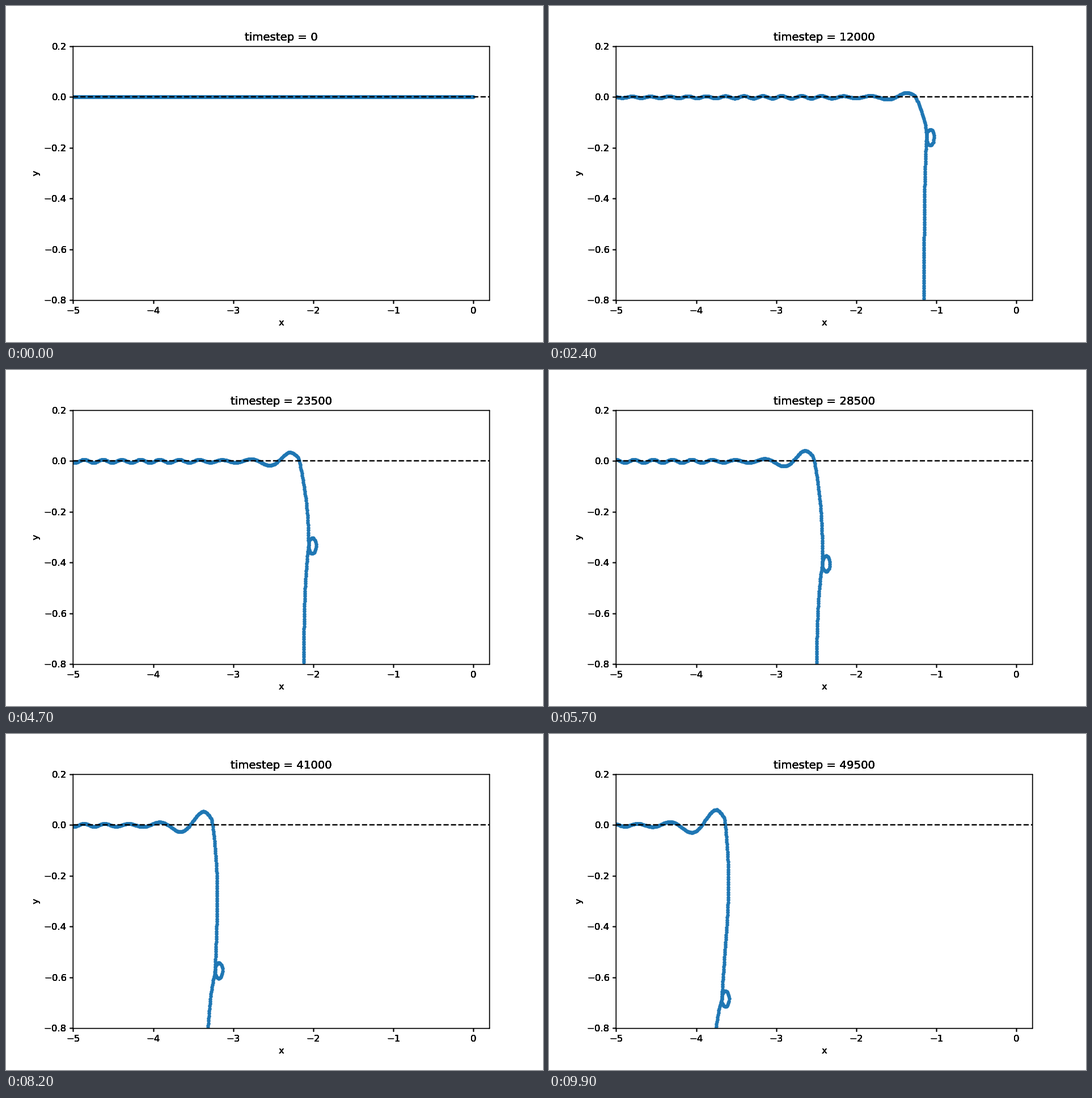
Recreate the animation shown at these times as a matplotlib script. Size 947 px wide and 592 px high, loop 10 s.

```python
import numpy as np
import matplotlib.pyplot as plt
from matplotlib.animation import FuncAnimation
from matplotlib.artist import Artist

W, H, FRAMES = 947, 592, 100
DPI = W / 8
LEFT, TOP = 0.125 * W, 0.12 * H
X_UNIT, Y_UNIT = 0.775 * W / 5.2, 0.755 * H
EDGE_X = LEFT + 5 * X_UNIT          # pixel position of the origin
EDGE_Y = TOP + 0.2 * Y_UNIT
SPACING = 0.01                      # distance between chain links
LINK = SPACING * Y_UNIT


def spline(points, steps=16):
    """Catmull-Rom curve through all points but the first and last."""
    p0, p1, p2, p3 = (points[k:len(points) - 3 + k, None] for k in range(4))
    t = np.linspace(0, 1, steps, endpoint=False)[None, :, None]
    curve = 0.5 * (2 * p1 + (p2 - p0) * t
                   + (2 * p0 - 5 * p1 + 4 * p2 - p3) * t ** 2
                   + (3 * p1 - p0 - 3 * p2 + p3) * t ** 3)
    return np.vstack([curve.reshape(-1, 2), points[-2]])


def ripples(n, peak, hump):
    """Wave train running ahead of the hump, j counts the crests."""
    j = np.linspace(0, 24, 1000)
    d = 33 * j + (45 + 0.45 * n) * (1 - np.exp(-j / 1.2))
    far = 3 * np.tanh(j / 2.5) * min(1, n / 10)
    far = far * np.exp(-(d / (22 * n + 1)) ** 2)
    amp = hump * np.exp(-2.1 * j * j / (j + 0.15)) + far
    x, y = peak - d, EDGE_Y - amp * np.cos(2 * np.pi * j)
    return np.column_stack([x, y])[x > LEFT - 20]


def path(n):
    """Pixel outline from the lower tip to the left border."""
    t = n / 100
    grow = min(1, n / 8)
    cx = EDGE_X - 7.02 * n + 0.0179 * n * n
    depth = (3.3 * n - 0.0021 * n * n) * (1 - np.exp(-n / 10))
    hump = 56 * (n / (n + 50)) ** 1.78
    cy = EDGE_Y + depth

    # strand above the loop, bulging to the right with time
    f = np.arange(4) / 4
    ux = (cx - 20 * grow * (1 - f) ** 1.7
          + 27 * t ** 2.8 * (1 - f * f) ** 1.6)
    upper = np.column_stack([ux, EDGE_Y + depth * f])

    knee = ux[0]
    peak = knee - 16
    crest = [(peak - 10.5, EDGE_Y - 0.65 * hump), (peak, EDGE_Y - hump),
             (knee - 5.5, EDGE_Y - 0.65 * hump)]

    a = np.linspace(0, 2 * np.pi, 13)
    loop = np.column_stack([cx + 6.5 * grow * (1 - np.cos(a)),
                            cy + 13.7 * grow * np.sin(a)])

    # strand below the loop, cut off under the stage
    tip = EDGE_Y + 0.0368 * n * Y_UNIT
    if tip > 600:
        tip = 600 + tip % LINK
    ly = np.linspace(cy + 24 * grow, tip, 7)
    lx = cx - 20 * t * (1 - np.exp((cy - ly) / 70))
    lower = np.column_stack([lx, ly])

    fall = spline(np.vstack([crest, upper, loop, lower, lower[-1:]]))
    return np.vstack([fall[::-1], ripples(n, peak, hump)])


def chain(n):
    """Evenly spaced links along the outline, in data units."""
    px, py = path(n).T
    x, y = (px - EDGE_X) / X_UNIT, (EDGE_Y - py) / Y_UNIT
    s = np.append(0, np.cumsum(np.hypot(np.diff(x), np.diff(y))))
    links = np.arange(0, s[-1], SPACING)
    return np.interp(links, s, x), np.interp(links, s, y)


class Heavy(Artist):
    """Draws the lettering and frame several times for dense edges."""

    def draw(self, renderer):
        parts = [ax.xaxis, ax.yaxis, ax.title, *ax.spines.values()]
        for part in parts * 4:
            part.draw(renderer)


fig = plt.figure(figsize=(8, H / DPI + 1e-9), dpi=DPI, facecolor="white")
fig.subplots_adjust(left=0.125, right=0.9, bottom=0.125, top=0.88)
ax = fig.add_subplot()
ax.set(xlim=(-5, 0.2), ylim=(-0.8, 0.2), xlabel="x", ylabel="y")
dots, = ax.plot([], [], ".", color="#1f77b4")
ax.axhline(0, color="black", ls="--", lw=1.5, zorder=2.4)
title = ax.set_title("timestep = 0")
heavy = Heavy()
heavy.set_zorder(-1)
fig.add_artist(heavy)


def update(n):
    dots.set_data(*chain(n))
    title.set_text(f"timestep = {500 * n}")
    return dots, title


anim = FuncAnimation(fig, update, frames=FRAMES, interval=100,
                     repeat=True, repeat_delay=0)
plt.show()
```
